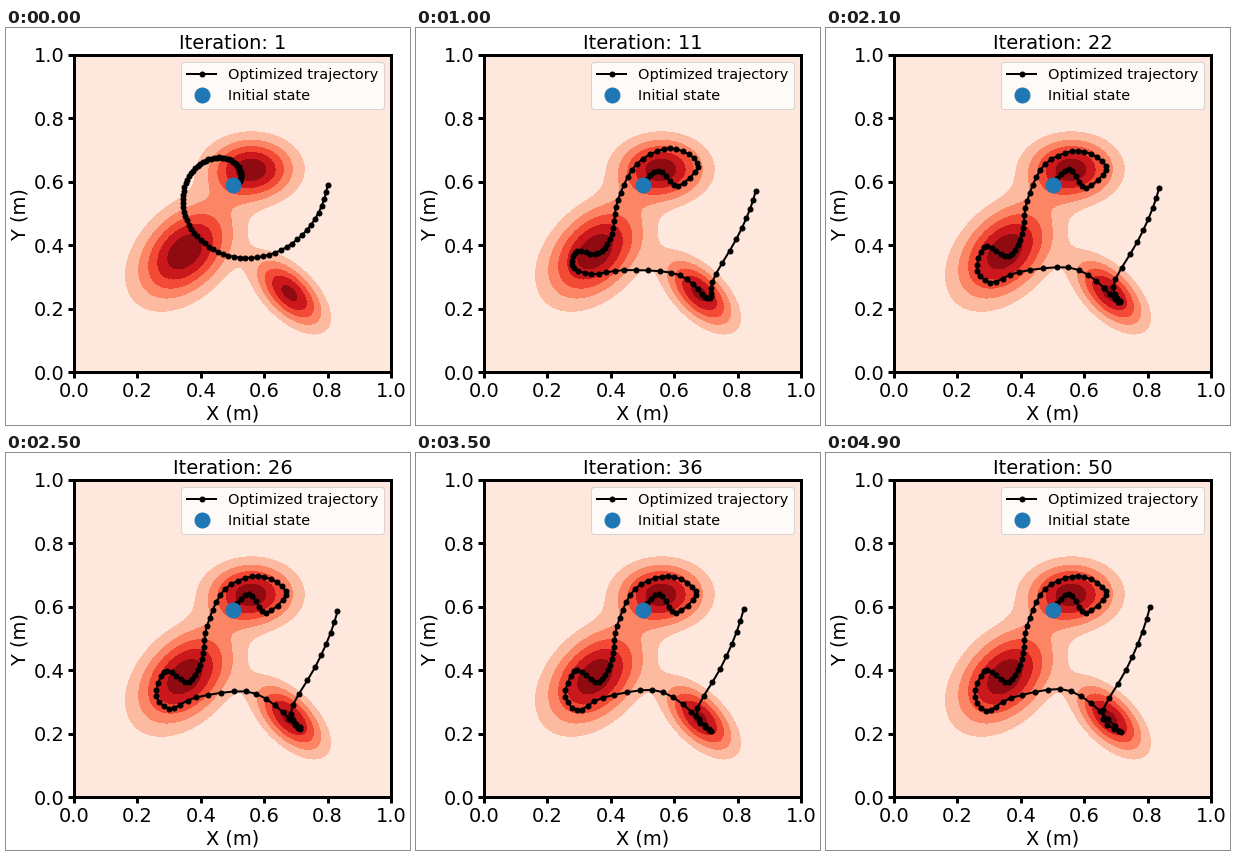
Write a matplotlib script that moves like this. It is 404 px wide and 397 px high and loops after 5 s.

```python
import numpy as np
import matplotlib.pyplot as plt
from matplotlib.animation import FuncAnimation

WIDTH, HEIGHT, DPI = 404, 397, 72
LEFT, TOP, SIDE_X, SIDE_Y = 68, 26.9, 317, 317.5
ITERATIONS, INTERVAL = 50, 100
EARLY, STEPS = 5, 82
START = np.array([0.5, 0.59])

plt.rcParams.update({
    "font.family": "DejaVu Sans", "font.size": 19.4,
    "axes.titlesize": 19.4, "axes.labelsize": 19.4, "axes.linewidth": 3,
    "xtick.labelsize": 19.4, "ytick.labelsize": 19.4,
    "xtick.major.width": 3, "ytick.major.width": 3,
    "xtick.major.size": 6, "ytick.major.size": 6,
})

# Turning points of the path: step, early position, final position (pixels).
TURNS = np.array([
    (0, 227, 157, 227, 157),
    (4, 238, 149, 243, 141),
    (9, 271, 150, 260, 160),
    (13, 289, 129, 280, 142),
    (19, 260, 111, 252, 123),
    (24, 228, 134, 219, 136),
    (29, 204, 170, 201, 173),
    (34, 196, 205, 196, 206),
    (39, 181, 218, 183, 229),
    (45, 160, 235, 158, 218),
    (49, 168, 236, 149, 244),
    (52, 190, 235, 160, 258),
    (56, 226, 240, 185, 245),
    (60, 268, 250, 234, 236),
    (68, 293, 266, 295, 279),
    (73, 308, 242, 277, 257),
    (76, 327, 209, 300, 217),
    (81, 344, 166, 324, 154),
])


def to_data(pixels):
    x, y = pixels.T
    return np.column_stack([(x - LEFT) / SIDE_X, 1 - (y - TOP) / SIDE_Y])


def spiral():
    s = np.linspace(0, 1, STEPS)
    angle = 2 * np.pi * s
    return START + 0.3 * s[:, None] * np.column_stack([np.cos(angle), np.sin(angle)])


def smooth(knots, points):
    """Cubic Hermite curve through the points, sampled at every step."""
    slope = np.gradient(points, knots, axis=0, edge_order=2)
    step = np.arange(STEPS)
    i = np.clip(np.searchsorted(knots, step, side="right") - 1, 0, len(knots) - 2)
    h = (knots[i + 1] - knots[i])[:, None]
    t = (step - knots[i])[:, None] / h
    ease = t * t * (3 - 2 * t)
    return (points[i] * (1 - ease) + points[i + 1] * ease
            + h * t * (1 - t) * ((1 - t) * slope[i] - t * slope[i + 1]))


def settle(elapsed, duration, time):
    """Exponential approach that reaches 1 at the end of the duration."""
    return np.expm1(-elapsed / time) / np.expm1(-duration / time)


SPIRAL = spiral()
EARLY_PATH, FINAL_PATH = (smooth(TURNS[:, 0], to_data(TURNS[:, k:k + 2]))
                          for k in (1, 3))
# The far end of the path settles much more slowly than its beginning.
SETTLE_TIME = 4 + 30 * np.linspace(0, 1, STEPS)[:, None] ** 4


def trajectory(iteration):
    if iteration < EARLY:
        u = settle(iteration - 1, EARLY - 1, 2.5)
        return SPIRAL + u * (EARLY_PATH - SPIRAL)
    u = settle(iteration - EARLY, ITERATIONS - EARLY, SETTLE_TIME)
    return EARLY_PATH + u * (FINAL_PATH - EARLY_PATH)


def gaussian(x, y, mean, var_x, var_y, cov):
    dx, dy = x - mean[0], y - mean[1]
    det = var_x * var_y - cov**2
    q = (var_y * dx**2 - 2 * cov * dx * dy + var_x * dy**2) / det
    return np.exp(-q / 2) / (2 * np.pi * np.sqrt(det))


fig = plt.figure(figsize=(WIDTH / DPI, HEIGHT / DPI), dpi=DPI, facecolor="white")
ax = fig.add_axes([LEFT / WIDTH, 1 - (TOP + SIDE_Y) / HEIGHT,
                   SIDE_X / WIDTH, SIDE_Y / HEIGHT])

gx, gy = np.meshgrid(np.linspace(0, 1, 100), np.linspace(0, 1, 100))
density = (0.5 * gaussian(gx, gy, (0.35, 0.38), 0.01, 0.01, 0.004)
           + 0.2 * gaussian(gx, gy, (0.68, 0.25), 0.005, 0.005, -0.003)
           + 0.3 * gaussian(gx, gy, (0.56, 0.64), 0.008, 0.004, 0))
ax.contourf(gx, gy, density, levels=np.arange(7) * 1.5, cmap="Reds")

line, = ax.plot([], [], "-o", color="black", linewidth=2, markersize=5,
                label="Optimized trajectory")
ax.plot(*START, "o", color="C0", markersize=15, linestyle="none",
        label="Initial state")
ax.set(xlim=(0, 1), ylim=(0, 1), xlabel="X (m)", ylabel="Y (m)")
ticks = np.arange(6) / 5
ax.set_xticks(ticks)
ax.set_yticks(ticks)
title = ax.set_title("Iteration: 1")
ax.legend(loc="upper right", fontsize=14.45)


def update(frame):
    iteration = frame + 1
    line.set_data(*trajectory(iteration).T)
    title.set_text(f"Iteration: {iteration}")
    return line, title


anim = FuncAnimation(fig, update, frames=ITERATIONS, interval=INTERVAL,
                     repeat=True, repeat_delay=0, blit=False)
plt.show()
```
